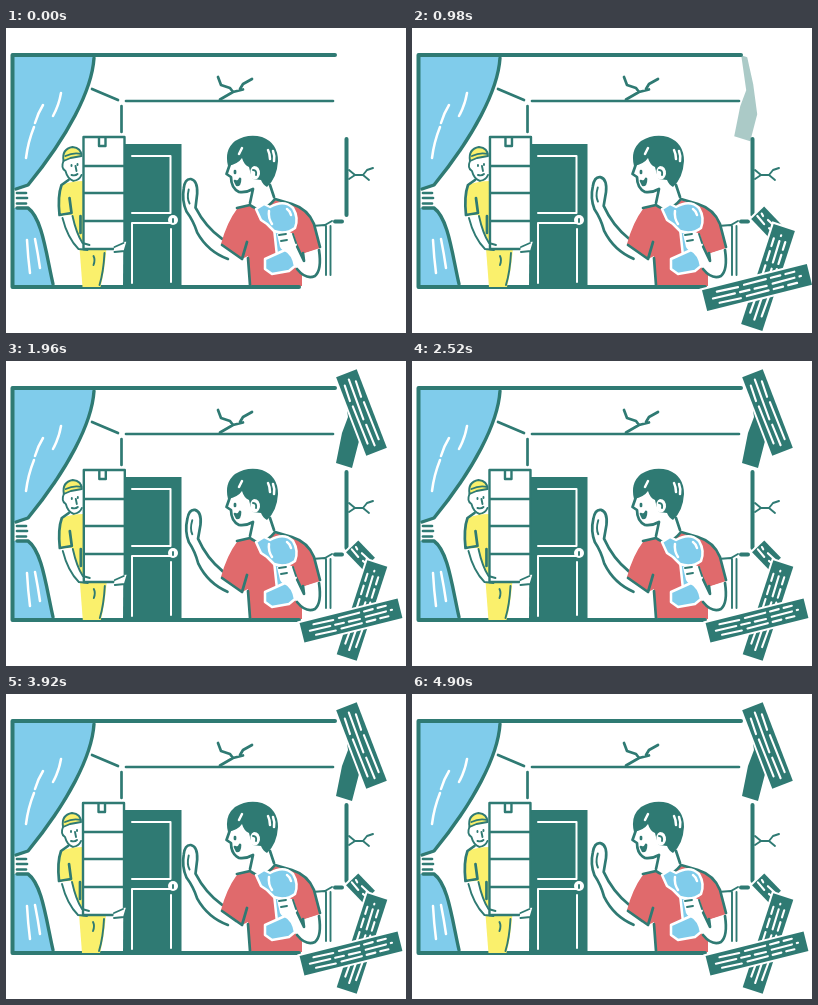
Recreate the animation shown at these times as an HTML page. Size 400 px wide and 305 px high, loop 4.97 s.

```html
<!DOCTYPE html>
<html lang="en">
<head>
<meta charset="utf-8">
<title>Home repair</title>
<style>
html, body { margin: 0; width: 100%; height: 100%; overflow: hidden; background: #fff; }
svg { display: block; width: 100vw; height: 100vh; }
.ln { fill: none; stroke: #2f7a73; stroke-width: 2.7; stroke-linecap: round; stroke-linejoin: round; }
.wt { fill: none; stroke: #fff; stroke-width: 2.5; stroke-linecap: round; stroke-linejoin: round; }
.skin { fill: #fff; }
.teal { fill: #2f7a73; }
.blue { fill: #80cceb; }
.yel { fill: #faf06c; }
.red { fill: #e06a6c; }
.thick { stroke-width: 4; }
.thin { stroke-width: 1.9; }
</style>
</head>
<body>
<svg viewBox="0 0 400 305">
  <!-- room -->
  <path class="ln" d="M86 61L112 72M120 73H327M115.500 78V104"/>
  <path class="ln" d="M212 49L215 57L224 60L227 64M214 71.500L227 64L237 61.500M234 61L237 56L246 51"/>
  <path class="ln thin" d="M343 142L349 147H357L361 142L367 140M357 147L363 152M349 147L343 151"/>
  <path class="ln thin" d="M306 198L319 197L326 193M320 198V247M324.500 198V247"/>
  <path class="ln thick" d="M329 193.500H336"/>

  <!-- curtain -->
  <path class="blue" d="M8 28H88C86 62 62 108 22 157L8 161Z"/>
  <path class="blue" d="M8 180H22C36 190 40 225 47 257H8Z"/>
  <path class="ln" style="stroke-width:3.400" d="M88 30C86 62 62 108 22 157L10 161M11 180H22C36 190 40 225 47 256"/>
  <path class="ln" d="M11 165H20M11 170H21M11 175.500H20"/>
  <path class="wt" d="M55 65Q53 77 47 88M37 77Q32 85 29 95M28 99Q22 114 20 130M21 212Q22 230 24 245M29 211Q32 226 34 240"/>
  <path class="ln thick" d="M329 27H6.500V259H287"/>
  <path class="ln thick" d="M340.500 111V187"/>

  <!-- door -->
  <path class="teal" d="M118 116H175.500V259H117Z"/>
  <path class="wt" style="stroke-width:2" d="M126 128H164.500V185H126M126 255V195H164M165 201V254"/>
  <circle class="skin" cx="167" cy="192" r="5"/>
  <path class="ln thin" d="M167 191V194"/>

  <!-- mover -->
  <g id="mover">
    <path class="yel" d="M74 220H101Q99 244 95 259H77Z"/>
    <path class="ln thin" d="M99 225Q98 244 94 257M88 228Q90 232 88 237"/>
    <path class="skin" d="M57 132Q59 150 66 154L76 151V128Z"/>
    <path class="ln thin" d="M58 133Q55 140 60 143Q62 151 68 153Q74 152 76 147"/>
    <path class="yel" d="M56 157Q66 153 78 153V213H73L66 187L54 188Q52 168 56 157Z"/>
    <path class="ln" d="M63 152L56 157Q52 168 54 187L66 185L64 170M75 188L75 205"/>
    <path class="skin" d="M56 188L66 187Q70 205 77 214L84 216L82 222L73 221Q61 208 56 188Z"/>
    <path class="yel" d="M58 133Q56 121 67 119Q76 120 76 128L65 130Z"/>
    <path class="ln thin" d="M58 133Q56 121 67 119Q76 120 76 128L65 130ZM60 128Q68 124 76 126"/>
    <path class="ln thin" d="M66 137V138M72 136V137M70 138L71 143M66 147Q70 148 72 146"/>
    <path class="skin" d="M78 109H119V221H78Z"/>
    <path class="ln" style="stroke-width:2.400" d="M78 109H119V221H78ZM79 138H118M79 165H118M79 193H118M93.500 110V118H100V110"/>
    <path class="skin" d="M109 218Q117 213 122 214L119 223L108 224Z"/>
    <path class="ln thin" d="M109 219L118 215M122 213L119 223L109 224M57 190Q62 210 73 221L82 222M67 188Q71 206 77 215L84 217"/>
  </g>

  <!-- waving arm -->
  <g id="arm">
    <path class="skin" d="M222 232Q202 224 190 205Q186 193 180 184Q175 172 177 163Q177 153 183 151Q190 150 190 166L189 180Q199 199 218 211Z"/>
    <path class="ln" d="M222 231Q202 224 191 205Q187 193 180 184Q175 173 177 161Q178 151 184 151.500Q191 153 190.500 166L189 180Q199 199 216 211"/>
    <path class="ln thin" d="M182 162Q180 171 183 176"/>
  </g>

  <!-- handyman -->
  <path class="skin" d="M245 158L243 178Q256 189 271 172L264 154Z"/>
  <path class="red" d="M243 177Q255 188 269 172L286 177Q302 181 308 197L314 220L296 226V258H244L242 228L236 231L215 216Q221 194 231 181Z"/>
  <path class="ln" d="M231 180L244 177Q256 187 269 171L286 176Q302 181 308 196L314 219M216 217L236 231L241 214M242 230L244 257"/>
  <path class="skin" d="M224 130L220 146L225 149Q225 160 233 164Q242 165 250 161L262 152V125Z"/>
  <path class="ln" d="M224 136L220.500 146L225 149Q225 160 233 164Q240 165 247 161L244 175M264 157L268 169"/>
  <path class="teal" d="M222 138Q218 122 229 113Q242 105 256 109Q272 115 272 133Q271 150 261 159Q257 157 255 152L247 151Q244 145 243 139Q238 137 236 130Q232 136 222 138Z"/>
  <path class="skin" d="M245 150Q243 139 248 138Q254 138 254 146Q252 154 245 150Z"/>
  <path class="ln thin" d="M247 142Q251 142 250 147"/>
  <path class="wt" d="M262 122Q264 126 264 131M267 123Q269 128 268 133M236 120L233 126"/>
  <path class="ln" d="M229 143V145M229 153Q232 155 234 151Q234 157 231 157Z"/>

  <!-- forearm and drill -->
  <path class="skin" d="M296 226L313 221Q317 243 309 248Q300 252 291 242L278 222L288 212Z"/>
  <path class="ln" d="M297 225L298 233L288 212M313 222Q316 242 309 248Q300 252 291 241"/>
  <g stroke="#fff" stroke-width="2.500" stroke-linejoin="round">
    <path class="blue" d="M268 200L279 202L282 226L271 228Z"/>
    <path class="blue" d="M250 181L258 176L264 179Q278 171 287 180Q293 190 289 200Q280 207 268 203L261 196L255 192Z"/>
    <path class="blue" d="M259 231L279 222Q287 226 289 238L283 243L266 246L259 241Z"/>
  </g>
  <path class="wt" d="M263 183Q262 190 266 196M281 181Q284 183 285 187"/>
  <path class="skin" d="M271 206Q281 200 288 207L291 217L285 224Q277 225 274 219Z"/>
  <path class="ln thin" d="M273 207L280 206M275 213L281 212M287 206L290 215"/>
  <path class="ln thick" d="M246 259H293"/>
  <g id="planks"></g>
</svg>
<script>
const LOOP = 4970, STEP = 70;
const byId = id => document.getElementById(id);

function add(parent, tag, attrs) {
  const el = document.createElementNS("http://www.w3.org/2000/svg", tag);
  for (const k in attrs) el.setAttribute(k, attrs[k]);
  return parent.appendChild(el);
}

// Centre, length, width, tilt, landing time, grain rows
const boards = [
  { x: 354.5, y: 194, len: 24, wid: 17, tilt: 46, at: 620, rows: 2 },
  { x: 356, y: 249.5, len: 99, wid: 21, tilt: -72, at: 640, rows: 3 },
  { x: 345, y: 259.5, len: 101, wid: 20, tilt: -14, at: 660, rows: 3 },
  { x: 346, y: 65, at: 900, shift: [-10, 8],
    path: "M337 21L343 23L349 50L353 80L346 107L330 102L336 72L342 56Z" },
  { x: 355.5, y: 51.5, len: 84, wid: 22, tilt: 69, at: 1190, rows: 3 }
];

function makeBoard(b) {
  b.el = add(byId("planks"), "g", {});
  if (b.path) {
    add(b.el, "path", { class: "teal", d: b.path });
    return;
  }
  const g = add(b.el, "g", { transform: `translate(${b.x} ${b.y}) rotate(${b.tilt})` });
  add(g, "rect", { x: -b.len / 2, y: -b.wid / 2, width: b.len, height: b.wid,
    fill: "#2f7a73", stroke: "#fff", "stroke-width": 4, "paint-order": "stroke" });
  let d = "";
  for (let i = 0; i < b.rows; i++) {
    const y = (i - (b.rows - 1) / 2) * b.wid * 0.27;
    const split = (i % 2 ? 0.12 : -0.14) * b.len;
    const end = b.len * (i % 2 ? 0.42 : 0.37);
    d += `M${-end} ${y}L${split - 3} ${y + 0.7}M${split + 3} ${y}L${end} ${y - 0.5}`;
  }
  add(g, "path", { class: "wt", d, "stroke-dasharray": b.len > 90 ? "21 5 9 5" : "none",
    style: "stroke-width:2.1" });
}
boards.forEach(makeBoard);

const clamp = v => Math.max(0, Math.min(1, v));

// Boards fade in while they shrink, or slide, to rest
function drawBoard(b, t) {
  const rest = (1 - clamp((t - b.at) / 1000)) ** 3;
  const s = b.shift ? 1 : 1 + 0.22 * rest;
  const [dx, dy] = (b.shift || [0, 0]).map(v => v * rest);
  b.el.setAttribute("opacity", clamp((t - b.at) / 200));
  b.el.setAttribute("transform",
    `translate(${b.x + dx} ${b.y + dy}) scale(${s}) translate(${-b.x} ${-b.y})`);
}

function draw(time) {
  const t = Math.floor((time % LOOP) / STEP) * STEP;
  const wave = 2.3 - 2 * Math.cos(2 * Math.PI * (t / 560 - 0.1));
  byId("arm").setAttribute("transform", `rotate(${wave} 225 223)`);
  const sway = 0.5 * Math.sin(2 * Math.PI * t / LOOP);
  byId("mover").setAttribute("transform", `translate(${sway - 0.5} 0)`);
  boards.forEach(b => drawBoard(b, t));
}

const start = performance.now();
function tick() {
  draw(performance.now() - start);
  requestAnimationFrame(tick);
}
tick();
</script>
</body>
</html>
```
